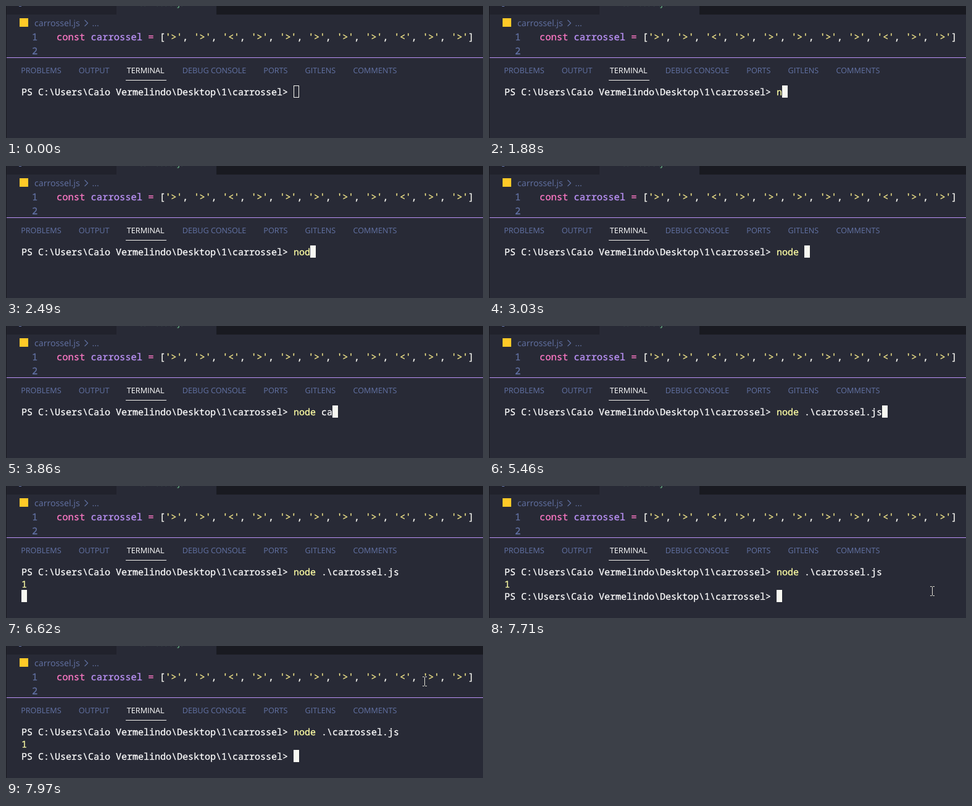
These frames come from a looping animation (773 by 216 pixels, 8000 ms). An HTML page:

```html
<!DOCTYPE html>
<html lang="pt">
<head>
<meta charset="utf-8">
<title>Terminal</title>
<style>
html, body { margin: 0; width: 100%; height: 100%; overflow: hidden; background: #282a36; }
svg { display: block; width: 773px; height: 216px; }
text { white-space: pre; text-rendering: geometricPrecision; }
.ui { font-family: "Open Sans", sans-serif; font-size: 14.2px; fill: #6272a4; }
.tabs { font-size: 12.65px; }
.tabs .on { fill: #fff; }
.mono, .mono tspan { fill: currentColor; stroke: currentColor; stroke-width: .3px; }
.mono { font-family: "Noto Sans Mono", monospace; }
.code { font-size: 15.44px; color: #f8f8f2; }
.term { font-size: 15px; color: #fff; }
.num { color: #6272a4; }
.pink { color: #ff79c6; }
.var { color: #bd93f9; }
.str { color: #f7ea8c; }
.cmd { color: #ffffa5; }

#cursor, #hollow, #draft, #full, #result, #prompt, #mouse {
  animation: 8s step-end infinite;
}
#cursor { animation-name: cursor; }
#hollow { animation-name: hollow; }
#draft { animation-name: draft; }
#full { animation-name: full; }
#result { animation-name: result; }
#prompt { animation-name: prompt; }
#mouse { animation-name: mouse; }

/* one character cell is 9 x 20 px */
@keyframes cursor {
  0% { transform: translate(0, 0); }
  23.5% { transform: translate(9px, 0); }
  26% { transform: translate(18px, 0); }
  31.125% { transform: translate(27px, 0); }
  33.75% { transform: translate(36px, 0); }
  37.875% { transform: translate(45px, 0); }
  41.625% { transform: translate(54px, 0); }
  47.375% { transform: translate(63px, 0); }
  59.75% { transform: translate(72px, 0); }
  63.25% { transform: translate(81px, 0); }
  68.25% { transform: translate(171px, 0); }
  81.125% { transform: translate(-441px, 20px); }
  82.375% { transform: translate(-441px, 40px); }
  83.625%, 100% { transform: translate(0, 40px); }
}
@keyframes hollow { 0% { visibility: visible; } 10.25%, 100% { visibility: hidden; } }
@keyframes draft { 0% { visibility: visible; } 68.25%, 100% { visibility: hidden; } }
@keyframes full { 0% { visibility: hidden; } 68.25%, 100% { visibility: visible; } }
@keyframes result { 0% { visibility: hidden; } 82.375%, 100% { visibility: visible; } }
@keyframes prompt { 0% { visibility: hidden; } 83.625%, 100% { visibility: visible; } }
@keyframes mouse {
  0% { visibility: hidden; transform: translate(718px, 172px); }
  96.375% { visibility: visible; transform: translate(718px, 172px); }
  97.125% { visibility: visible; transform: translate(645px, 138px); }
  97.875% { visibility: visible; transform: translate(567px, 98px); }
  98.75% { visibility: visible; transform: translate(612px, 72px); }
  99.625%, 100% { visibility: visible; transform: translate(678px, 58px); }
}
</style>
</head>
<body>
<svg viewBox="0 0 773 216">
  <rect width="773" height="216" fill="#282a36"/>

  <!-- editor tabs and breadcrumb -->
  <rect width="179" height="14" fill="#21222c"/>
  <rect x="341" width="432" height="14" fill="#191a21"/>
  <rect x="21" width="4" height="1" fill="#6272a4"/>
  <text class="ui" x="215" y="-.3" style="fill:#73c991">carrossel.js</text>
  <rect x="22" y="20" width="14" height="14" fill="#ffca28"/>
  <g class="ui">
    <text x="46" y="32.7">carrossel.js</text>
    <text x="139.5" y="32.7">...</text>
  </g>
  <path d="M127.5 23l5 5-5 5" fill="none" stroke="#6272a4" stroke-width="1.1"/>

  <g class="mono code">
    <text class="num" x="42" y="56">1</text>
    <text class="num" x="42" y="79">2</text>
    <text id="line" x="82" y="56"><tspan class="pink">const</tspan> <tspan class="var">carrossel</tspan> <tspan class="pink">=</tspan> [</text>
  </g>

  <!-- panel -->
  <rect y="84" width="773" height="1" fill="#bd93f9"/>
  <rect width="1" height="216" fill="#191a21"/>
  <g class="ui tabs">
    <text x="24.2" y="110">PROBLEMS</text>
    <text x="117.7" y="110">OUTPUT</text>
    <text x="195.8" y="110" class="on">TERMINAL</text>
    <text x="285.8" y="110">DEBUG CONSOLE</text>
    <text x="417.3" y="110">PORTS</text>
    <text x="484.5" y="110">GITLENS</text>
    <text x="562.5" y="110">COMMENTS</text>
  </g>
  <rect x="194" y="121" width="66" height="1" fill="#f8f8f2"/>

  <g class="mono term">
    <text x="25" y="146">PS C:\Users\Caio Vermelindo\Desktop\1\carrossel&gt;</text>
    <text x="466" y="146" class="cmd">node</text>
    <text id="draft" x="511" y="146">carr</text>
    <text id="full" x="511" y="146">.\carrossel.js</text>
    <text id="result" x="25" y="166" class="cmd">1</text>
    <text id="prompt" x="25" y="186">PS C:\Users\Caio Vermelindo\Desktop\1\carrossel&gt;</text>
  </g>

  <!-- the block cursor hides what is not typed yet -->
  <g id="cursor">
    <rect x="466" y="130" width="180" height="20" fill="#282a36"/>
    <rect x="466" y="130" width="9" height="20" fill="#f8f8f2"/>
    <rect id="hollow" x="467" y="131" width="7" height="18" fill="#282a36"/>
  </g>

  <path id="mouse" d="M-3-7.5h2.5l1 1 1-1h2.5M.5-6.5v13M-3 7.5h2.5l1-1 1 1h2.5" fill="none" stroke="#e4e2d6"/>
</svg>
<script>
const line = document.getElementById('line');

function add(text, cls) {
  const span = document.createElementNS(line.namespaceURI, 'tspan');
  span.textContent = text;
  if (cls) span.setAttribute('class', cls);
  line.append(span);
}

[...'>><>>>>><>>'].forEach((arrow, i) => {
  if (i) add(', ');
  add(`'${arrow}'`, 'str');
});
add(']');
</script>
</body>
</html>
```
